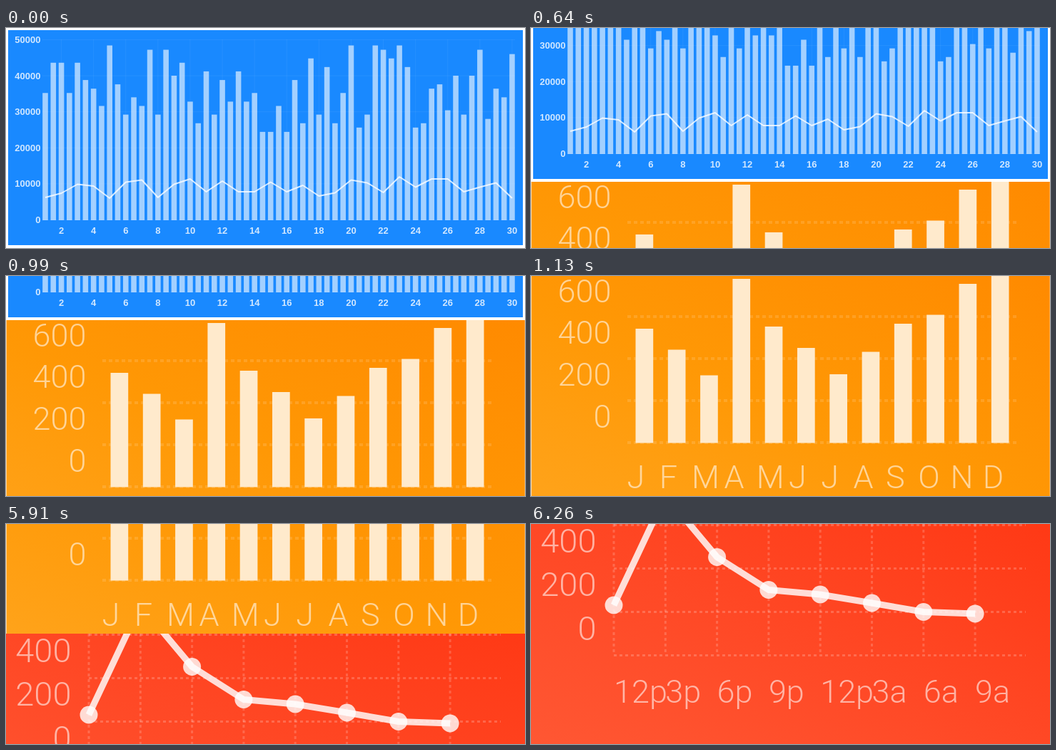
These frames come from a looping animation (727 px wide and 309 px high, 8000 ms). An HTML page:

```html
<!DOCTYPE html>
<html lang="en">
<head>
<meta charset="utf-8">
<title>Three charts</title>
<style>
  html, body { margin: 0; width: 100%; height: 100%; overflow: hidden; background: #fff; }
  #stage { display: block; width: 727px; height: 309px; }
  text { fill: #fff; }
  .blue text { font: bold 13px "Liberation Sans", Arial, sans-serif; fill-opacity: .8; }
  .soft { filter: blur(.7px); }
  .soft text { font: 300 45px Roboto, sans-serif; fill-opacity: .58; }
  .soft text.big { font-size: 47px; }
</style>
</head>
<body>
<svg id="stage" width="727" height="309">
  <defs>
    <linearGradient id="orange" x1="0" y1="1" x2="1" y2="0">
      <stop offset="0" stop-color="#ffa31a"/>
      <stop offset=".45" stop-color="#ff9805"/>
      <stop offset="1" stop-color="#ff8a00"/>
    </linearGradient>
    <linearGradient id="red" x1="0" y1="1" x2="1" y2="0">
      <stop offset="0" stop-color="#ff5733"/>
      <stop offset=".5" stop-color="#ff4825"/>
      <stop offset="1" stop-color="#ff3915"/>
    </linearGradient>
  </defs>
  <g id="strip"></g>
</svg>
<script>
const HEIGHT = 309, LOOP = 8000, STEP = 70, STEPS = 10;
const SLIDES = [500, 5630];
const strip = document.getElementById('strip');

const rect = (x, y, w, h, fill, alpha = 1) =>
  `<rect x="${x}" y="${y}" width="${w}" height="${h}" fill="${fill}" fill-opacity="${alpha}"/>`;
const line = (x1, y1, x2, y2, width, alpha, dash = 'none') =>
  `<path d="M${x1} ${y1}L${x2} ${y2}" stroke="#fff" stroke-width="${width}" stroke-opacity="${alpha}" stroke-dasharray="${dash}"/>`;
const polyline = (points, width, alpha) =>
  `<polyline points="${points.join(' ')}" fill="none" stroke="#fff" stroke-width="${width}" stroke-opacity="${alpha}" stroke-linejoin="round"/>`;
const label = (text, x, y, anchor, cls = '') =>
  `<text x="${x}" y="${y}" text-anchor="${anchor}" class="${cls}">${text}</text>`;
const repeat = (n, draw) => Array.from({ length: n }, (_, i) => draw(i)).join('');
const panel = (index, content) =>
  `<svg y="${index * HEIGHT}" width="727" height="${HEIGHT}">${content}</svg>`;

function dailyChart() {
  // Bar drops below the tallest bar, in units of 6.07 px
  const drops = [11, 4, 4, 11, 4, 8, 10, 14, 0, 9, 16, 12, 14, 1, 16, 1, 7, 4, 13, 18,
    6, 16, 8, 13, 6, 13, 11, 20, 20, 14, 20, 8, 18, 3, 16, 5, 18, 11, 0, 19,
    16, 0, 1, 3, 0, 5, 19, 18, 10, 9, 15, 7, 16, 7, 1, 17, 10, 12, 2];
  const trend = [238, 232, 219.5, 222, 239, 216.5, 213.5, 238, 219.5, 212, 230, 215, 230, 230, 216.5,
    230, 221, 236, 231.5, 213.5, 217.5, 231, 209, 223.5, 212, 212, 230, 223.5, 217.5, 239];
  const base = 269.5, dayX = day => 55 + (day - 1) * 22.55;
  const rowY = i => base - i * 50.6;
  return '<g class="blue">' + rect(3, 3, 721, 302, '#1989ff') +
    repeat(6, i => line(51, rowY(i), 713, rowY(i), 1, .06) +
      label(i * 10000, 48.5, rowY(i) + 4.5, 'end')) +
    repeat(15, i => line(dayX(2 * i + 2), 16, dayX(2 * i + 2), base, 1, .06) +
      label(2 * i + 2, dayX(2 * i + 2), 289, 'middle')) +
    drops.map((drop, i) => {
      const top = 24.5 + drop * 6.07;
      return rect(dayX(1 + i / 2) - 3.8, top, 7.6, base + .5 - top, '#fff', .6);
    }).join('') +
    polyline(trend.map((y, i) => [dayX(i + 1), y]), 2, .8) + '</g>';
}

function monthlyChart() {
  const tops = [74, 103.5, 139.5, 4, 71, 101, 138, 106.5, 67, 54.5, 11, -30];
  const base = 234.5, pitch = 45.3;
  return rect(0, 0, 727, HEIGHT, 'url(#orange)') +
    rect(0, 0, 1, HEIGHT, '#fff', .6) + rect(726, 0, 1, HEIGHT, '#fff', .25) +
    '<g class="soft">' +
    repeat(4, i => line(135, 57 + i * 59, 680, 57 + i * 59, 4, .13, '5 4') +
      label(600 - i * 200, 112.5, 36.5 + i * 58.7, 'end')) +
    tops.map((top, i) => rect(146.5 + i * pitch, top, 24.7, base - top, '#ffeacc')).join('') +
    [...'JFMAMJJASOND'].map((m, i) => label(m, 134.5 + i * pitch, 298, 'start')).join('') +
    '</g>';
}

function hourlyChart() {
  const hours = ['12p', '3p', '6p', '9p', '12p', '3a', '6a', '9a'];
  const hourX = i => 116 + i * 72.3;
  const points = [114, -40, 46.5, 92.5, 99, 111, 123.5, 126].map((y, i) => [hourX(i), y]);
  return rect(0, 0, 727, HEIGHT, 'url(#red)') + '<g class="soft">' +
    repeat(4, i => line(116, 1.5 + i * 61, 693, 1.5 + i * 61, 3, .2, '4 4')) +
    repeat(3, i => label(400 - i * 200, 91.5, 40 + i * 61.3, 'end', 'big')) +
    hours.map((hour, i) => line(hourX(i), 0, hourX(i), 184, 3, .18, '4 4') +
      label(hour, hourX(i), 251, 'start')).join('') +
    polyline(points, 9, .82) +
    points.map(([x, y]) => `<circle cx="${x}" cy="${y}" r="12.5" fill="#fff" fill-opacity=".8"/>`).join('') +
    '</g>';
}

strip.innerHTML = panel(0, dailyChart()) + panel(1, monthlyChart()) + panel(2, hourlyChart());

function slideOffset(time, start) {
  const steps = Math.floor((time - start) / STEP) + 1;
  return Math.round(Math.min(STEPS, Math.max(0, steps)) * HEIGHT / STEPS);
}

const began = performance.now();
function draw() {
  const time = (performance.now() - began) % LOOP;
  const offset = SLIDES.reduce((sum, start) => sum + slideOffset(time, start), 0);
  strip.setAttribute('transform', `translate(0 ${-offset})`);
  requestAnimationFrame(draw);
}
draw();
</script>
</body>
</html>
```
